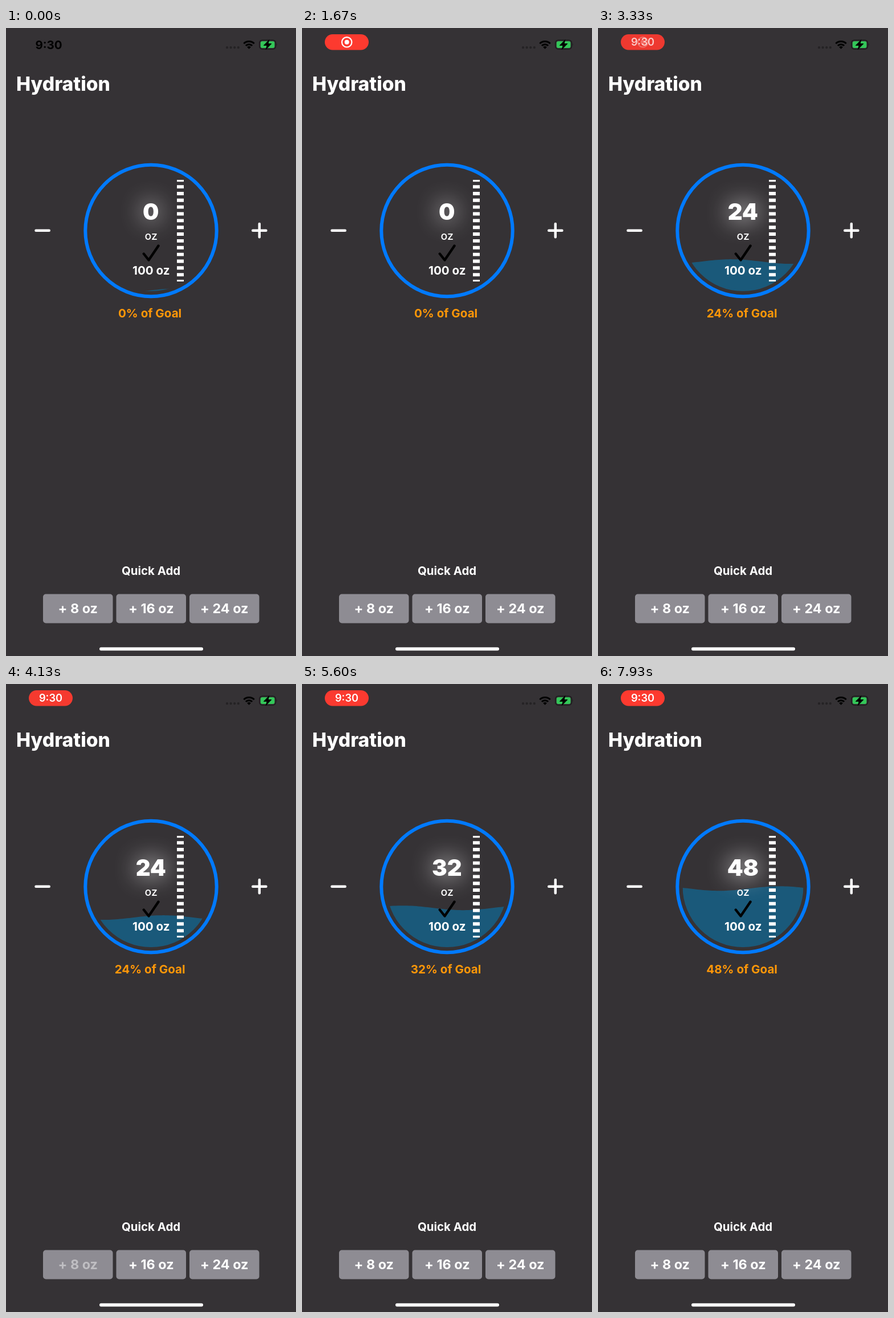
Animation, 509 px wide and 1100 px high, one loop 8000 ms. Source, as an HTML page:

```html
<!DOCTYPE html>
<html lang="en">
<head>
<meta charset="utf-8">
<title>Hydration</title>
<style>
  html, body { margin: 0; width: 100%; height: 100%; overflow: hidden; background: #353235; }
  svg { display: block; }
  text { font-family: Inter, "Open Sans", sans-serif; font-weight: 700; font-optical-sizing: none; fill: #fff; }
  .mid { text-anchor: middle; }
  .line { fill: none; stroke: #fff; stroke-linecap: round; stroke-linejoin: round; }
</style>
</head>
<body>
<svg width="509" height="1100" viewBox="0 0 509 1100">
  <defs>
    <clipPath id="bowl"><circle cx="254.5" cy="355" r="106"/></clipPath>
    <filter id="glow" filterUnits="userSpaceOnUse" x="140" y="210" width="230" height="230" color-interpolation-filters="sRGB">
      <feDropShadow dx="0" dy="0" stdDeviation="20" flood-color="#fff"/>
    </filter>
  </defs>

  <!-- status bar -->
  <text id="clock" class="mid" x="75" y="36.5" font-size="20.5" style="fill:#000">9:30</text>
  <g id="pill">
    <rect id="pillBack" x="40" y="11" width="77" height="27.5" rx="13.7" fill="#ff3b30"/>
    <g id="record">
      <circle class="line" cx="78.7" cy="24.8" r="8.7" stroke-width="2.2"/>
      <circle cx="78.7" cy="24.8" r="4" fill="#fff"/>
    </g>
    <text id="pillTime" class="mid" x="78.5" y="31.3" font-size="18.3" style="font-weight:600">9:30</text>
  </g>
  <path class="line" d="M388 34.2H409" stroke-width="4.2" stroke-dasharray="0 6.6" style="stroke:#242224"/>
  <path d="M416.3 26.2a14.6 14.6 0 0 1 20.4 0l-2 2.1a11.7 11.7 0 0 0-16.4 0zM419.8 29.9a9.6 9.6 0 0 1 13.4 0l-2.1 2.2a6.6 6.6 0 0 0-9.2 0zM423.2 33.4a4.7 4.7 0 0 1 6.6 0l-3.3 3.4z"/>
  <rect x="444.8" y="21.2" width="28.6" height="15.8" rx="5" fill="none" stroke="#1d1b1d" stroke-width="1.6"/>
  <rect x="446.8" y="23.2" width="24.6" height="11.8" rx="3" fill="#34c759"/>
  <path d="M474.8 26.6q1.7 2.4 0 5z" fill="#1d1b1d"/>
  <path d="M461.8 20.8l-9.4 9.6h5.8l-2 7 9.6-9.8h-5.8z" stroke="#000" stroke-linejoin="round"/>

  <text x="18" y="110" font-size="33.6" style="font-weight:800">Hydration</text>

  <!-- gauge -->
  <circle cx="254.5" cy="355" r="115.2" fill="none" stroke="#007aff" stroke-width="6"/>
  <path id="water" clip-path="url(#bowl)" fill="#0080bf" fill-opacity=".5"/>
  <path d="M306 266V444" stroke="#fff" stroke-width="12" stroke-dasharray="5.9 5.95" stroke-dashoffset="2.7"/>
  <text id="amount" class="mid" x="254.3" y="336" font-size="40" style="font-weight:900" filter="url(#glow)"></text>
  <text class="mid" x="254.8" y="370.5" font-size="19.5" style="font-weight:500">oz</text>
  <path class="line" d="M241.8 395.5L250.5 406.5L267.5 381.5" stroke-width="4.4" style="stroke:#000"/>
  <text class="mid" x="254.8" y="432" font-size="20.6">100 oz</text>
  <text id="goal" class="mid" x="252.6" y="507" font-size="20.6" style="fill:#ff9708"></text>
  <path class="line" d="M52.5 354.7H75.7M433.2 354.7H456.4M444.8 343.1V366.3" stroke-width="4.5"/>

  <!-- quick add -->
  <text class="mid" x="254.6" y="958" font-size="20.4">Quick Add</text>
  <g id="buttons"></g>
  <rect x="164" y="1084.7" width="182" height="5.8" rx="2.9" fill="#fff"/>
</svg>
<script>
const LOOP = 8000;
const $ = id => document.getElementById(id);
const ramp = (t, from, to) => Math.min(1, Math.max(0, (t - from) / (to - from)));
const smooth = x => x * x * (3 - 2 * x);

const buttons = [8, 16, 24].map((oz, i) => {
  const x = 65 + i * 128.5;
  $('buttons').insertAdjacentHTML('beforeend',
    `<rect x="${x}" y="991.5" width="122.5" height="51" rx="5" fill="#8e8c93"/>
     <text class="mid" x="${x + 61.3}" y="1025.3" font-size="23.4">+ ${oz} oz</text>`);
  return { oz, label: $('buttons').lastElementChild };
});

// Each tap dims its label at once and lets it fade back after the release.
const taps = [
  { oz: 24, down: 2230, up: 2370 },
  { oz: 8, down: 4110, up: 4250 },
  { oz: 16, down: 6730, up: 6870 }
];

function labelOpacity(t, tap) {
  if (t < tap.down) return 1;
  if (t < tap.up) return 1 - 0.8 * ramp(t, tap.down, tap.down + 30);
  return 0.2 + 0.8 * smooth(ramp(t, tap.up, tap.up + 330));
}

function waterPath(t, percent) {
  const left = 148.5, size = 212, level = 460 - size * percent / 100;
  const trough = 198 - size * t / 1000;
  let d = `M${left} 470`;
  for (let x = left; x <= left + size; x += 4) {
    const y = level + 4 * Math.cos((x - trough) / size * 2 * Math.PI);
    d += `L${x} ${y.toFixed(2)}`;
  }
  return d + `V470Z`;
}

function draw(t) {
  const total = taps.reduce((sum, tap) => sum + (t >= tap.up ? tap.oz : 0), 0);
  $('amount').textContent = total;
  $('goal').textContent = `${total}% of Goal`;
  $('water').setAttribute('d', waterPath(t, total));
  for (const { oz, label } of buttons)
    label.setAttribute('opacity', labelOpacity(t, taps.find(tap => tap.oz === oz)));

  const shown = smooth(ramp(t, 350, 650));
  const swap = smooth(ramp(t, 3000, 3500));
  const pulse = 0.5 + 0.5 * Math.cos((t - 1800) / 1000 * Math.PI);
  $('clock').setAttribute('opacity', 1 - shown);
  $('pill').setAttribute('opacity', shown);
  $('pillBack').setAttribute('opacity', 0.81 + 0.19 * pulse);
  $('record').setAttribute('opacity', 1 - swap);
  $('pillTime').setAttribute('opacity', swap);
}

const start = performance.now();
function tick() {
  draw((performance.now() - start) % LOOP);
  requestAnimationFrame(tick);
}
tick();
</script>
</body>
</html>
```
